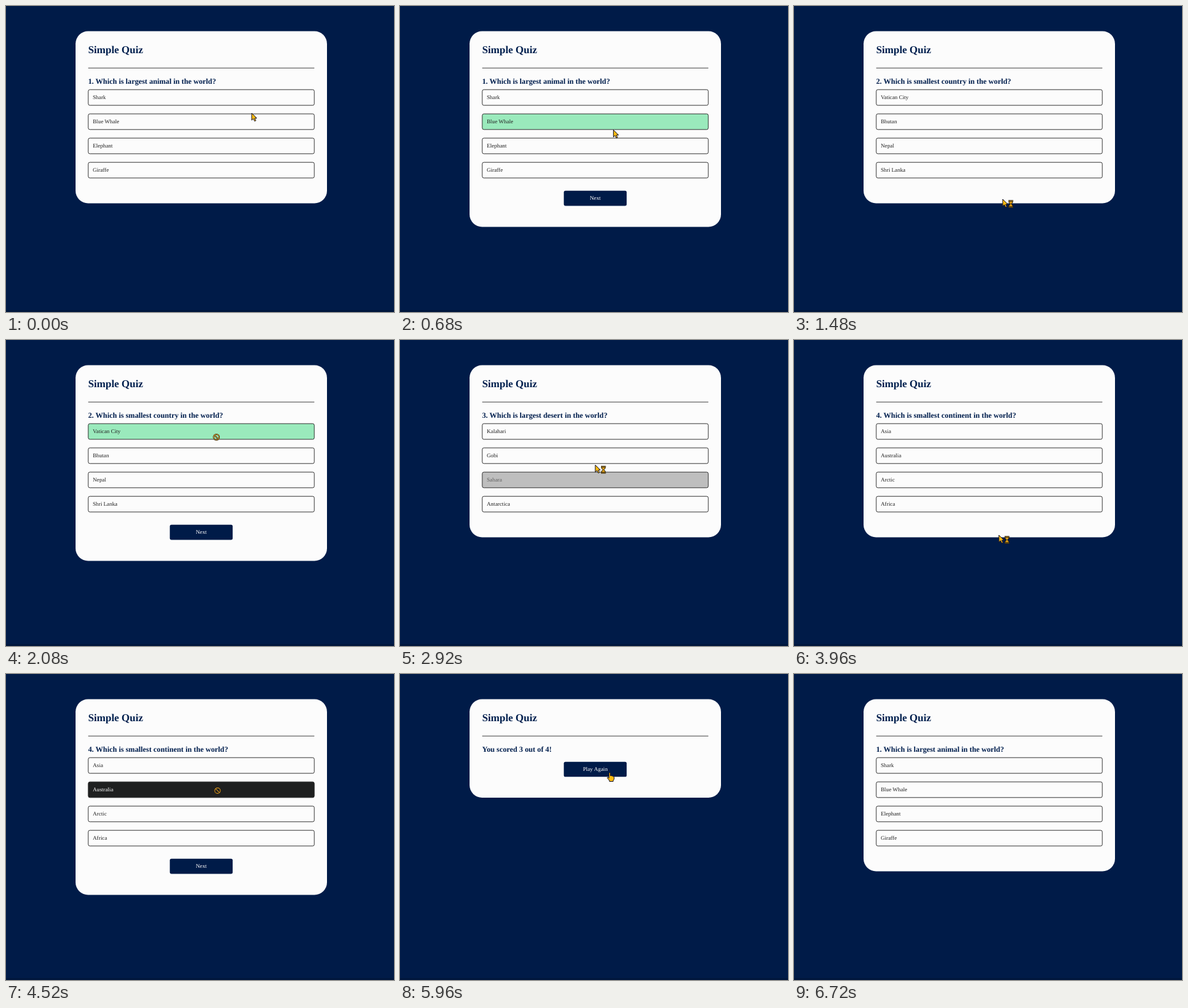
These frames come from a looping animation (608x480 px, 6.76 s). An HTML page:

```html
<!DOCTYPE html>
<html lang="en">
<head>
<meta charset="utf-8">
<title>Simple Quiz</title>
<style>
  html, body { margin: 0; width: 100%; height: 100%; overflow: hidden; background: #001b48; }
  svg { display: block; }
  text { font-family: "Liberation Serif", "Times New Roman", serif; font-size: 8.76px; text-rendering: geometricPrecision; }
  .title, .question { font-weight: bold; fill: #001e4d; }
  .title { font-size: 16.4px; }
  .question { font-size: 11.8px; }
  .option rect { stroke: #222; stroke-width: .9; }
  .button rect { fill: #001b48; }
  .button text { fill: #fff; text-anchor: middle; }
  .pointer { fill: #fbba12; stroke: #14142a; stroke-width: 1; stroke-linejoin: round; }
</style>
</head>
<body>
<svg width="608" height="480" viewBox="0 0 608 480">
  <rect width="608" height="480" fill="#001b48"/>
  <rect y="477" width="608" height="3" fill="#00163c"/>
  <rect id="card" x="109" y="39.5" width="394" height="270" rx="19.7" fill="#fcfcfc"/>
  <text class="title" x="128.7" y="73.5">Simple Quiz</text>
  <path d="M128.8 97.3H483.2" stroke="#333" stroke-width=".9"/>
  <text class="question" id="question" x="128.7" y="121.6"></text>
  <g id="options"></g>
  <g class="button" id="button">
    <rect x="256.7" width="98.5" height="23.6" rx="2.6"/>
    <text x="306" y="14.6"></text>
  </g>
  <g id="cursor">
    <g id="arrow">
      <path class="pointer" d="M0 0V11.2L2.6 8.8L4.6 12.7L6.5 11.8L4.7 8H8Z"/>
      <g id="hourglass">
        <path d="M9 2.5H16.5M9 12.5H16.5" stroke="#2a2008" stroke-width="2"/>
        <path d="M9.8 3.2H15.7V5L13.6 7.5L15.7 10V11.8H9.8V10L11.9 7.5L9.8 5Z" fill="#d79a18" stroke="#1d180c" stroke-width="1"/>
        <path d="M9.4 2.6H16.1M9.4 12.4H16.1" stroke="#c08a1a" stroke-width=".6"/>
      </g>
    </g>
    <path id="hand" class="pointer" d="M-1.1 8.8V1Q0 -.6 1.1 1V5.2L2.8 5L4.6 5.6L6 6.2L7 7.4V10.4L5.6 12.4V14H-.4V12.5L-3.6 8.6Q-3.6 6.8 -2.2 7.6Z"/>
    <g id="blocked" fill="none">
      <path d="M-4.4 0A4.4 4.4 0 1 1 4.4 0A4.4 4.4 0 1 1 -4.4 0M-3.1 -3.1L3.1 3.1" stroke="#1c1408" stroke-width="2"/>
      <path d="M-4.4 0A4.4 4.4 0 1 1 4.4 0A4.4 4.4 0 1 1 -4.4 0M-3.1 -3.1L3.1 3.1" stroke="#d09428" stroke-width="1.1"/>
    </g>
  </g>
</svg>
<script>
const LOOP = 6760, STEP = 40, FADE = 100, HIDE = 6620;
const LIGHT = [252, 252, 252], DARK = [31, 32, 32], INK = [34, 34, 34], WHITE = [255, 255, 255];
const GREEN = [154, 234, 188], RED = [255, 147, 147];

const quiz = [
  { ask: "1. Which is largest animal in the world?", options: ["Shark", "Blue Whale", "Elephant", "Giraffe"], right: 1 },
  { ask: "2. Which is smallest country in the world?", options: ["Vatican City", "Bhutan", "Nepal", "Shri Lanka"], right: 0 },
  { ask: "3. Which is largest desert in the world?", options: ["Kalahari", "Gobi", "Sahara", "Antarctica"], right: 3 },
  { ask: "4. Which is smallest continent in the world?", options: ["Asia", "Australia", "Arctic", "Africa"], right: 1 }
];

// answer: time of the click on an option, pick: which option
const phases = [
  { start: 0, q: 0, answer: 520, pick: 1 },
  { start: 1320, q: 1, answer: 1960, pick: 0 },
  { start: 2640, q: 2, answer: 3240, pick: 2 },
  { start: 3880, q: 3, answer: 4510, pick: 1 },
  { start: 5160, q: -1 },
  { start: 6040, q: 0, answer: Infinity }
];

// time, x, y
const path = [
  [0, 385, 168], [240, 345, 182], [520, 335, 184], [640, 335, 184],
  [1100, 328, 303], [1320, 327, 303], [1500, 327, 303],
  [1760, 330, 146], [2060, 330, 144], [2440, 325, 303], [2740, 322, 303],
  [2860, 310, 225], [2920, 306, 196], [3000, 306, 198], [3100, 310, 218], [3340, 310, 219],
  [3700, 321, 306], [4000, 321, 306], [4240, 331, 184], [4400, 331.5, 183], [4640, 331.5, 183],
  [5000, 329, 303], [5360, 329, 300], [5600, 328.5, 154.5], [6160, 328.5, 154.5],
  [6360, 334, 160], [6500, 340, 168], [LOOP, 340, 168]
];

const $ = id => document.getElementById(id);
const clamp = v => Math.min(1, Math.max(0, v));
const mix = (a, b, k) => a.map((v, i) => v + (b[i] - v) * k);
const rgb = c => `rgb(${c.map(Math.round)})`;
const show = (el, on) => el.setAttribute("display", on ? "inline" : "none");
const optionTop = i => 131.2 + 38 * i;

$("options").innerHTML = quiz[0].options.map((_, i) =>
  `<g class="option"><rect x="128.9" y="${optionTop(i)}" width="354.2" height="24.6" rx="2.6"/>` +
  `<text x="136" y="${optionTop(i) + 15.1}"></text></g>`).join("");
const rows = [...document.querySelectorAll(".option")].map(g => ({ box: g.children[0], label: g.children[1] }));

function pointerAt(t) {
  const i = Math.max(1, path.findIndex(p => p[0] > t));
  const [a, b] = [path[i - 1], path[i]];
  return mix(a, b, (t - a[0]) / (b[0] - a[0])).slice(1);
}

function optionUnder(y) {
  return rows.findIndex((_, i) => y >= optionTop(i) && y <= optionTop(i) + 24.6);
}

// Hover fades in and out at a constant rate.
function hoverLevel(i, t, start, end) {
  let level = 0;
  for (let s = Math.max(start, Math.min(t, end) - 3 * FADE); s < Math.min(t, end); s += 4) {
    const over = s < HIDE && optionUnder(pointerAt(s)[1]) === i;
    level = clamp(level + (over ? 4 : -4) / FADE);
  }
  return level;
}

function drawOptions(phase, t) {
  const item = quiz[phase.q];
  const answered = t >= phase.answer;
  rows.forEach(({ box, label }, i) => {
    const level = hoverLevel(i, t, phase.start, phase.answer);
    let fill = mix(LIGHT, DARK, level), ink = mix(INK, WHITE, level);
    if (answered) {
      const goal = i === item.right ? GREEN : i === phase.pick ? RED : LIGHT;
      const k = clamp((t - phase.answer - 10) / FADE);
      fill = mix(fill, goal, k);
      ink = mix(ink, INK, k);
    }
    box.style.fill = rgb(fill);
    label.style.fill = rgb(ink);
    label.textContent = item.options[i];
  });
}

function drawCursor(t, asking, answered, buttonTop) {
  const [x, y] = pointerAt(t);
  const onOption = asking && optionUnder(y) >= 0;
  const onButton = buttonTop !== null && y >= buttonTop && y <= buttonTop + 23.6 && x > 257 && x < 355;
  const blocked = onOption && answered;
  const hand = onButton || (onOption && !answered);
  $("cursor").setAttribute("transform", `translate(${x} ${y})`);
  show($("cursor"), t < HIDE);
  show($("blocked"), blocked);
  show($("hand"), hand);
  show($("arrow"), !blocked && !hand);
  show($("hourglass"), t > 700 && t < 5300);
}

function draw(t) {
  const phase = phases.filter(p => p.start <= t).pop();
  const asking = phase.q >= 0;
  const answered = asking && t >= phase.answer;
  const buttonTop = !asking ? 137.7 : answered ? 289.8 : null;

  $("card").setAttribute("height", !asking ? 154.5 : answered ? 307 : 270);
  $("question").textContent = asking ? quiz[phase.q].ask : "You scored 3 out of 4!";
  show($("options"), asking);
  if (asking) drawOptions(phase, t);

  show($("button"), buttonTop !== null);
  if (buttonTop !== null) {
    $("button").setAttribute("transform", `translate(0 ${buttonTop})`);
    $("button").lastElementChild.textContent = asking ? "Next" : "Play Again";
  }
  drawCursor(t, asking, answered, buttonTop);
}

const begin = performance.now();
function tick() {
  const t = (performance.now() - begin) % LOOP;
  draw(Math.floor(t / STEP) * STEP);
  requestAnimationFrame(tick);
}
tick();
</script>
</body>
</html>
```
